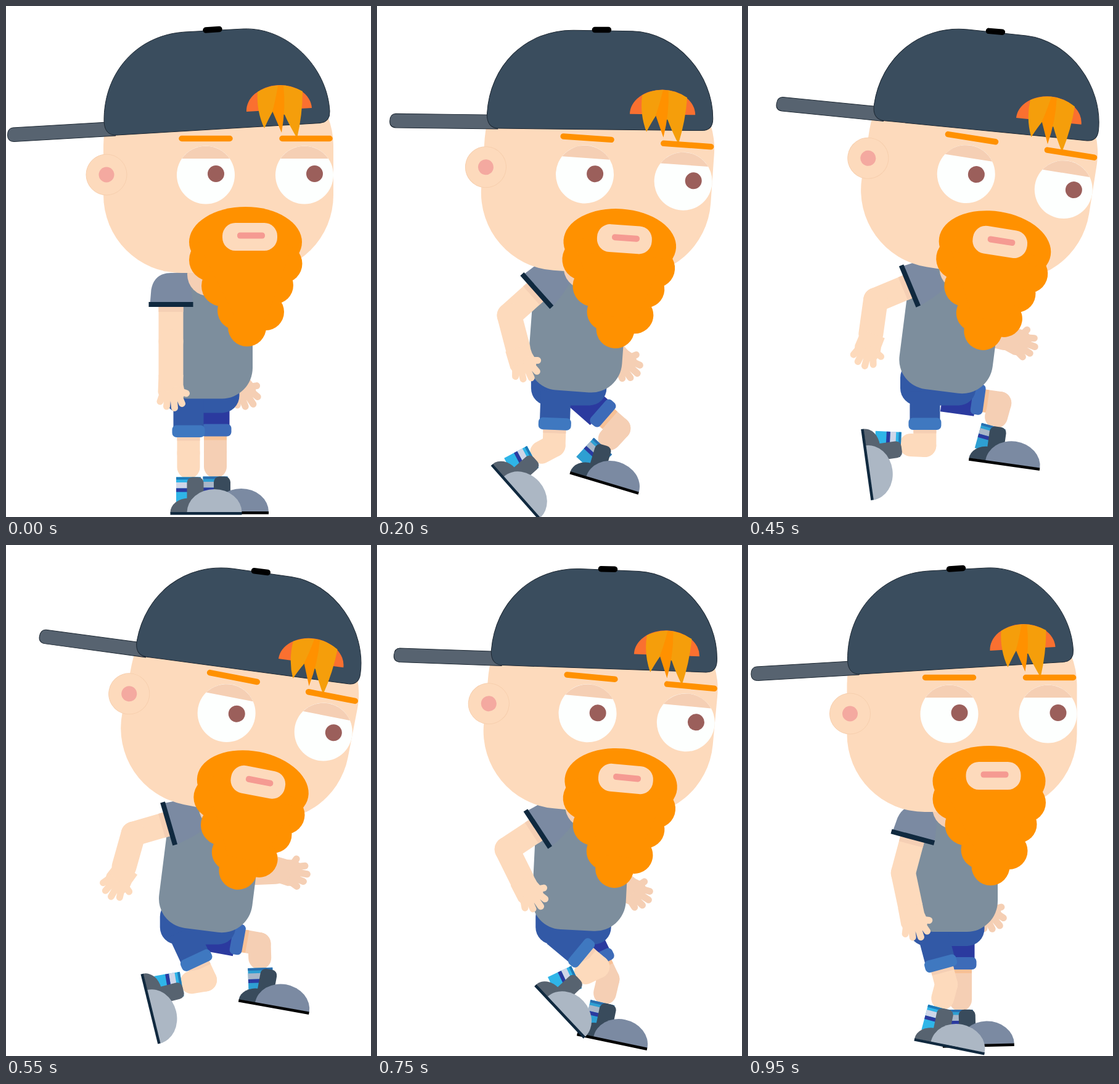
Recreate the animation shown at these times as an HTML page. Size 592x827 px, loop 1 s.

```html
<!DOCTYPE html>
<html lang="en">
<head>
<meta charset="utf-8">
<title>Walking boy in a cap</title>
<style>
  html, body { margin: 0; width: 100%; height: 100%; overflow: hidden; background: #fff; }
  svg { display: block; width: 592px; height: 827px; }
  .near { --skin: #fddabc; --shade: #f5cfb4; --cloth: #3259a6; --cuff: #3f78c0;
          --boot: #576370; --toe: #acb7c4; --sole: #10293f;
          --band: #1d7ab8; --sock: #2fb5e8; --pale: #cfd6e8; }
  .far  { --skin: #f5cfb4; --shade: #f8c196; --cloth: #2b3a9f; --cuff: #3d6bb8;
          --boot: #394b5c; --toe: #7b8aa2; --sole: #000;
          --band: #2a6fb0; --sock: #2e9fd2; --pale: #a8b6c8; }
  .limb { fill: none; stroke: var(--skin); stroke-linecap: round; }
  .leg { stroke-width: 37; }
  .sleeve { stroke-width: 40; }
  .skin { fill: #fddabc; }
  .shade { fill: #f5cfb4; }
  .hair { fill: #ff9100; }
  .cap { stroke: #1d2833; stroke-width: 1; }
</style>
</head>
<body>
<svg viewBox="0 0 592 827">
  <defs>
    <g id="palm">
      <path d="M-20 -16H20V0L23 14L18 25L-17 25L-21 12Z" style="fill:var(--skin)"/>
      <path class="limb" stroke-width="11" d="M-13 14L-17.500 27M-5 16L-7 35M4 16L6 37.500M12 16L18 30.500M8 8L25 14"/>
    </g>
    <g id="sock">
      <rect x="-20" y="39" width="40" height="42" style="fill:var(--sock)"/>
      <rect x="-20" y="39" width="40" height="4" style="fill:var(--band)"/>
      <rect x="-20" y="47.500" width="40" height="9.500" style="fill:var(--pale)"/>
      <rect x="-20" y="57" width="40" height="6" fill="#2b3a9f"/>
    </g>
    <g id="shoe">
      <rect x="-2.500" y="-21" width="27" height="55" rx="9" style="fill:var(--boot)"/>
      <path d="M-29.500 36A29.500 23 0 0 1 29.500 36Z" style="fill:var(--boot)"/>
      <path d="M-2.500 36A44.500 37.500 0 0 1 86.500 36Z" style="fill:var(--toe)"/>
      <rect x="-29.500" y="35.500" width="116" height="4.500" style="fill:var(--sole)"/>
    </g>
  </defs>

  <g class="far" id="farArm">
    <path class="limb sleeve" d="M0 -50V-14"/>
    <g id="farHand"><use href="#palm"/></g>
  </g>

  <g id="body">
    <g class="far" id="farThigh">
      <path class="limb leg" d="M0 45V79"/>
      <rect x="-18.500" y="52" width="37" height="7" style="fill:var(--shade)"/>
      <g id="farCalf">
        <path class="limb leg" d="M0 0V23"/>
        <use href="#sock"/>
        <g id="farFoot"><use href="#shoe"/></g>
      </g>
      <rect x="-27" y="-15" width="50" height="55" style="fill:var(--cloth)"/>
      <rect x="-24" y="33" width="50" height="20" rx="7" style="fill:var(--cuff)"/>
    </g>
    <rect x="-68" y="-50" width="122.500" height="73" rx="28" fill="#3259a6"/>
    <g class="near" id="thigh">
      <path class="limb leg" d="M0 45V80"/>
      <rect x="-18.500" y="53" width="37" height="7" style="fill:var(--shade)"/>
      <g id="calf">
        <path class="limb leg" d="M0 0V23"/>
        <use href="#sock"/>
        <g id="foot"><use href="#shoe"/></g>
      </g>
      <rect x="-24.500" y="-8" width="49" height="48" style="fill:var(--cloth)"/>
      <rect x="-26.500" y="35" width="53" height="19.500" rx="7" style="fill:var(--cuff)"/>
    </g>

    <g id="torso">
      <path d="M-76 -175Q-76 -204 -45 -204H45Q76 -204 76 -175V-50A50 50 0 0 1 26 0H-28A48 48 0 0 1 -76 -48Z" fill="#7d8e9d"/>
      <g class="near" id="arm">
        <path class="limb sleeve" d="M0 20V80"/>
        <rect x="-20" y="23" width="40" height="9" style="fill:var(--shade)"/>
        <g id="forearm">
          <path class="limb sleeve" d="M0 0V55"/>
          <g id="hand"><use href="#palm"/></g>
        </g>
        <path d="M-34 20L-32 -4Q-27 -31 0 -31H25Q34 -8 36 20Z" fill="#7b8aa2"/>
        <rect x="-36" y="16" width="72" height="8" fill="#10293f"/>
      </g>
      <circle class="shade" cx="5" cy="-201" r="35"/>
    </g>
  </g>

  <g id="head"><g transform="translate(-398 -371.500)">
    <rect class="skin" x="158" y="100" width="373" height="332" rx="126"/>
    <circle class="skin" cx="163" cy="273" r="33" stroke="#f7cfae"/>
    <circle cx="163" cy="273" r="12.500" fill="#f4a9a0"/>

    <path class="cap" fill="#576370" d="M11 197L165 188L178 210L13 219.500Q2.500 219.500 2.500 209Q2.500 198 11 197Z"/>
    <path class="cap" fill="#3a4d5e" d="M159 187C158 108 212 47 290 42L385 37C456 34 521 98 525 170Q526 188 509 189.500L180 209Q160 210 159 187Z"/>
    <path d="M324 39L346 37.500" stroke="#000" stroke-width="9.500" stroke-linecap="round"/>
    <path d="M390 171A53 40 -3.300 0 1 496 165Z" fill="#fa7030"/>
    <path d="M408 139Q443 118 481 138Q481 175 472 214Q458 190 452 176L433 170Q426 182 419 198Q406 170 408 139Z" fill="#f59e0b"/>
    <path class="hair" d="M441 129Q436 158 432 170L447 205Q454 165 450 129Z"/>

    <path d="M285 214.500H363M448 214.500H525" stroke="#ff9100" stroke-width="9.500" stroke-linecap="round"/>
    <g id="eye">
      <circle cx="324" cy="273.500" r="47" fill="#fdfffe"/>
      <path class="shade" d="M285.300 247A47 47 0 0 1 362.700 247Z"/>
      <circle cx="340.500" cy="271.500" r="13.500" fill="#9b5f5b"/>
    </g>
    <use href="#eye" x="160"/>

    <g class="hair">
      <ellipse cx="388.500" cy="382" rx="91.500" ry="57"/>
      <circle cx="331" cy="411" r="34"/><circle cx="449" cy="417" r="31.500"/>
      <circle cx="350" cy="453" r="33"/><circle cx="436" cy="452" r="30"/>
      <circle cx="374" cy="493" r="31"/><circle cx="421" cy="495" r="30"/>
      <circle cx="391" cy="520" r="31"/>
      <path d="M320 400H460L425 500H370Z"/>
    </g>
    <rect class="skin" x="351" y="351" width="89" height="45" rx="21"/>
    <rect x="375" y="366.500" width="45" height="10" rx="4.500" fill="#f59a92"/>
  </g></g>
</svg>

<script>
  const LOOP = 1000, STEP = 50;

  const line = p => p;
  const out = p => Math.sin(p * Math.PI / 2);
  const wave = p => (1 - Math.cos(p * Math.PI)) / 2;

  // Starts and ends the loop at rest; points are [time, value, ease towards it]
  function track(rest, ...points) {
    const keys = [[0, rest], ...points, [LOOP, rest]];
    return t => {
      const i = keys.findIndex(k => k[0] > t);
      const [t0, v0] = keys[i - 1];
      const [t1, v1, ease = line] = keys[i];
      return v0 + (v1 - v0) * ease((t - t0) / (t1 - t0));
    };
  }

  function place(id, x, y, turn) {
    document.getElementById(id).setAttribute('transform',
      `translate(${x.toFixed(2)} ${y.toFixed(2)}) rotate(${turn.toFixed(2)})`);
  }

  const bodyX = track(324, [350, 314, wave], [950, 329, wave]);
  const bodyY = track(635.5, [200, 623.5], [750, 623.5], [950, 626]);
  const headX = track(398, [500, 413], [950, 400.5]);
  const nod = track(0, [560, 1], [930, 0, wave]);
  const reach = track(0, [350, 0.54], [560, 1], [650, 1], [750, 0.51], [950, 0.13]);

  // Each joint hangs from its parent at x, y and only turns
  const joints = [
    ['torso', 0, 0, track(0, [350, 7.4], [550, 7.2], [800, 1.8], [950, 0])],
    ['thigh', -28, 8, track(0, [400, 4, wave], [700, -54, wave], [950, -15, wave])],
    ['calf', 0, 80, track(0, [200, 60], [600, 112], [750, 115], [950, 30])],
    ['foot', 0, 60, track(0, [250, -17], [500, -9], [650, 5], [750, -18])],
    ['farThigh', 15.5, 8, track(0, [500, -83, out], [900, 0, wave])],
    ['farCalf', 0, 79, track(0, [350, 117, out], [950, 0])],
    ['farFoot', 0, 60, track(0, [200, -26], [350, -27], [550, 12], [800, -5])],
    ['arm', -56.5, -172.5, track(0, [200, 44], [650, 73], [950, 15])],
    ['forearm', 0, 80, track(0, [200, -63], [550, -58], [750, -83], [950, -27])],
    ['hand', 0, 70, track(0, [200, -4], [550, 20], [750, -3])]
  ];

  function pose(t) {
    const n = nod(t), r = reach(t);
    place('head', headX(t), 371.5 + 11 * n, 11.2 * n);
    place('body', bodyX(t), bodyY(t), 0);
    place('farArm', 378 + 75 * r ** 1.4, 614 - 87 * r ** 0.6, -20 - 74 * r);
    place('farHand', 0, 0, 27 * r - 8);
    for (const [id, x, y, turn] of joints) place(id, x, y, turn(t));
  }

  const start = performance.now();
  function tick() {
    const t = (performance.now() - start) % LOOP;
    pose(Math.floor(t / STEP) * STEP);
    requestAnimationFrame(tick);
  }
  tick();
</script>
</body>
</html>
```
